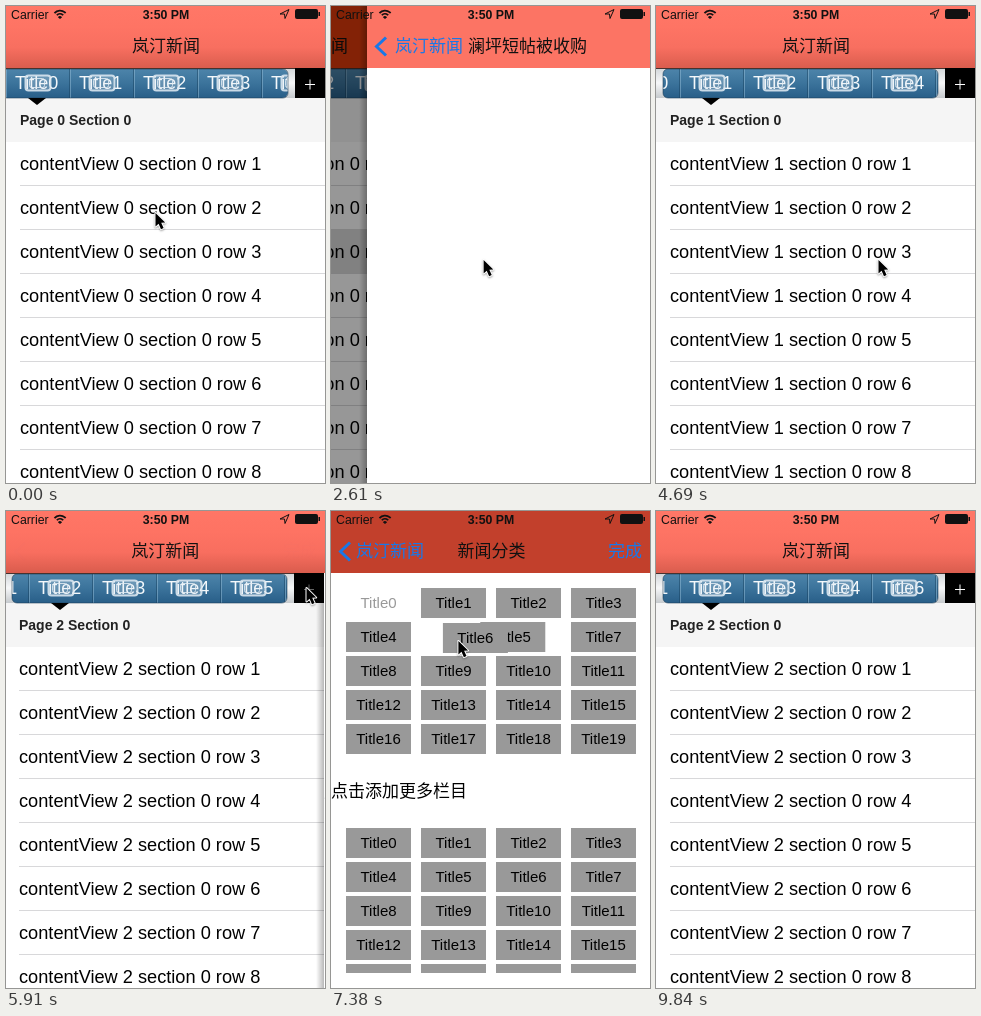
An HTML page with a canvas for the animation above (9.89 s loop, 319 by 477 pixels).

```html
<!DOCTYPE html>
<html lang="zh-CN">
<head>
<meta charset="utf-8">
<title>News tabs</title>
<style>
html, body { margin: 0; width: 100%; height: 100%; overflow: hidden; background: #fff; }
canvas { display: block; width: 319px; height: 477px; }
</style>
</head>
<body>
<canvas id="stage"></canvas>
<script>
const W = 319, H = 477, LOOP = 9890, NAV = 62;
const SANS = '"Liberation Sans", Arial, sans-serif';
const CJK = '"Noto Sans CJK SC", "Noto Sans CJK", sans-serif';
const BLUE = '#1878e8', RED = '#fc7464';
const APP = '岚汀新闻', STORY = '澜坪短帖被收购', CATEGORY = '新闻分类';

const canvas = document.getElementById('stage');
const c = canvas.getContext('2d');
const dpr = window.devicePixelRatio || 1;
canvas.width = Math.round(W * dpr);
canvas.height = Math.round(H * dpr);

const lerp = (a, b, k) => a + (b - a) * k;
const ramp = (t, a, b) => Math.min(1, Math.max(0, (t - a) / (b - a)));
const smooth = (t, a, b) => { const k = ramp(t, a, b); return k * k * (3 - 2 * k); };
const easeOut = (t, a, b) => 1 - (1 - ramp(t, a, b)) ** 3;

const PATH = [
  [60, 149, 207], [500, 162, 232], [1040, 152, 254], [2240, 152, 254],
  [2400, 116, 254], [2610, 152, 254], [3220, 232, 254], [3950, 232, 254],
  [4250, 110, 254], [4420, 110, 254], [4690, 222, 254], [4860, 222, 254],
  [5130, 105, 254], [5200, 105, 254], [5670, 300, 77], [6350, 300, 77],
  [6890, 180, 129], [7010, 180, 129], [7380, 127, 130], [7500, 115, 130],
  [7650, 115, 130], [8030, 262, 52], [8120, 279, 38], [8600, 279, 38],
  [9060, 219, 409], [9170, 219, 409], [9470, 306, 478]
];

function cursorAt(t) {
  const i = PATH.findIndex(k => k[0] > t);
  if (i === 0) return PATH[0].slice(1);
  if (i < 0) return PATH[PATH.length - 1].slice(1);
  const a = PATH[i - 1], b = PATH[i], k = ramp(t, a[0], b[0]);
  return [lerp(a[1], b[1], k), lerp(a[2], b[2], k)];
}

function rect(x, y, w, h, fill) {
  c.fillStyle = fill;
  c.fillRect(x, y, w, h);
}

function text(str, x, y, size, fill, opt = {}) {
  c.font = `${opt.weight || 400} ${size}px ${opt.cjk ? CJK : SANS}`;
  c.textAlign = opt.align || 'left';
  c.fillStyle = fill;
  c.fillText(str, x, y);
}

function round(x, y, w, h, r) {
  c.beginPath();
  c.roundRect(x, y, w, h, r);
}

function poly(points) {
  c.beginPath();
  points.forEach(p => c.lineTo(p[0], p[1]));
  c.closePath();
}

function fade(x0, y0, x1, y1, ...stops) {
  const g = c.createLinearGradient(x0, y0, x1, y1);
  stops.forEach((s, i) => g.addColorStop(i / (stops.length - 1), s));
  return g;
}

function layer(draw, dx = 0, alpha = 1) {
  c.save();
  c.globalAlpha = alpha;
  c.translate(Math.round(dx), 0);
  draw();
  c.restore();
}

function statusBar() {
  text('Carrier', 5, 13, 12.3, '#111');
  text('3:50 PM', 160, 13, 12.3, '#111', { weight: 700, align: 'center' });
  c.strokeStyle = c.fillStyle = '#111';
  c.lineWidth = 1.8;
  for (const r of [4.2, 7.4]) {
    c.beginPath();
    c.arc(54, 12, r, -Math.PI * 0.77, -Math.PI * 0.23);
    c.stroke();
  }
  c.beginPath();
  c.moveTo(54, 13);
  c.arc(54, 13, 2.8, -Math.PI * 0.77, -Math.PI * 0.23);
  c.fill();
  c.lineWidth = 1;
  poly([[274, 8], [283, 3.5], [279, 12.5], [278.5, 8]]);
  c.stroke();
  round(289, 3, 23, 10, 2);
  c.fill();
  rect(312.5, 6, 1.5, 4, '#111');
}

function listPage(page, selected) {
  rect(0, 92, W + 1, H - 92, '#fff');
  rect(0, 92, W + 1, 44, '#f5f5f5');
  text(`Page ${page} Section 0`, 14, 119, 14, '#222', { weight: 700 });
  for (let i = 0; i < 8; i++) {
    const y = 136 + 44 * i;
    if (selected === i + 1) rect(0, y - 1, W + 1, 45, '#d9d9d9');
    text(`contentView ${page} section 0 row ${i + 1}`, 14, y + 28, 18.2, '#000');
    rect(14, y + 43, W - 13, 1, '#d8d8da');
  }
}

function tab(label, x) {
  rect(x - 1, 63, 1, 29, 'rgba(20,60,90,.45)');
  rect(x, 63, 1, 29, 'rgba(150,190,215,.5)');
  text(label, x + 9, 83, 18, '#f4f8fb');
  c.strokeStyle = 'rgba(225,236,244,.85)';
  c.fillStyle = 'rgba(225,236,244,.25)';
  c.lineWidth = 2;
  round(x + 19.5, 69.5, 25, 15, 3);
  c.fill();
  c.stroke();
  c.lineWidth = 1;
  round(x + 23.5, 72.5, 15, 9, 2);
  c.stroke();
}

function tabStrip(s) {
  const scroll = Math.max(0, 64 * s.tab - 24);
  const left = 7 * ramp(scroll, 0, 12);
  rect(0, NAV, 290, 30, fade(0, NAV, 0, 92, '#d2d6d9', '#f6f7f8', '#c6cacd'));
  c.save();
  round(left, 63, 282 - left, 29, [left ? 5 : 0, 6, 6, left ? 5 : 0]);
  c.fillStyle = fade(0, 63, 0, 92, '#4d84aa', '#3b739b', '#285e88');
  c.fill();
  c.clip();
  s.tabs.forEach((n, i) => tab('Title' + n, i * 64 - scroll));
  c.restore();
  c.strokeStyle = 'rgba(25,55,80,.55)';
  c.lineWidth = 1;
  round(left - (left ? 0 : 4), 63, 282 - left + (left ? 0 : 4), 29, 5);
  c.stroke();
  rect(0, NAV, W, 1, '#46322f');
  const tip = 31 + 64 * s.tab - scroll;
  poly([[tip - 9, 92], [tip + 9, 92], [tip, 99]]);
  c.fillStyle = '#000';
  c.fill();
  rect(289, NAV, 31, 30, '#000');
  const ink = s.pressed ? '#666' : '#fff';
  rect(299, 78, 10, 1, ink);
  rect(303.5, 73.5, 1, 10, ink);
}

function mainBody(s) {
  rect(0, NAV, W + 1, H - NAV, '#fff');
  const base = Math.floor(s.page);
  for (const p of [base, base + 1]) {
    const x = 320 * (p - s.page);
    if (x < W) layer(() => listPage(p, s.selected), x);
  }
  tabStrip(s);
}

function detailBody() {
  rect(0, NAV, W + 1, H - NAV, '#fff');
}

function cell(label, x, y) {
  rect(x, y, 65, 30, '#999');
  text(label, x + 32.5, y + 20, 15, '#000', { align: 'center' });
}

const slot = i => [15 + 75 * (i % 4), 34 * Math.floor(i / 4)];

function categoryBody(t) {
  rect(0, NAV, W + 1, H - NAV, '#fff');
  text('Title0', 47.5, 97, 15, '#999', { align: 'center' });
  for (let i = 1; i < 20; i++) {
    if (i === 5 || i === 6) continue;
    const [x, y] = slot(i);
    cell('Title' + i, x, 77 + y);
  }
  cell('Title5', lerp(90, 165, smooth(t, 7180, 7465)), 111);
  // The held cell follows the pointer, then settles in its new slot.
  const [px, py] = cursorAt(Math.min(t, 7500));
  const held = t > 7010, drop = smooth(t, 7520, 7680);
  cell('Title6', held ? lerp(px - 15, 90, drop) : 165, held ? lerp(py - 18, 111, drop) : 111);

  text('点击添加更多栏目', 0, 286, 17, '#000', { cjk: true });
  c.save();
  c.beginPath();
  c.rect(0, 317, W + 1, 145);
  c.clip();
  for (let i = 0; i < 20; i++) {
    const [x, y] = slot(i);
    cell('Title' + i, x, 317 + y);
  }
  c.restore();
}

function chevron() {
  c.strokeStyle = BLUE;
  c.lineWidth = 3;
  c.beginPath();
  c.moveTo(19, 31.5);
  c.lineTo(9.5, 40.5);
  c.lineTo(19, 49.5);
  c.stroke();
}

// Soft dark patch left behind the pressed bar button.
function pressGlow() {
  c.beginPath();
  c.rect(0, 0, W + 1, NAV);
  c.clip();
  c.shadowColor = 'rgba(186,58,42,.9)';
  c.shadowBlur = 18 * dpr;
  c.shadowOffsetX = 600 * dpr;
  rect(242 - 600, -20, 110, 72, '#000');
}

// q runs from 0 (root title) to 1 (pushed title).
function navBar(q, o = {}) {
  rect(0, 0, W + 1, NAV, o.fill || fade(0, 0, 0, NAV, '#ff7767', '#fe7464', '#f86f60', '#d95d4e'));
  if (q > 0 && !o.fill) layer(() => rect(0, 0, W + 1, NAV, RED), 0, q);
  if (o.dark) layer(() => rect(0, 0, W + 1, NAV, '#c2402c'), 0, o.dark);
  if (o.glow) layer(pressGlow, 0, o.glow);
  const home = o.home || 25;
  const x = home + (126 - home) * (1 - q) ** 1.1;
  const title = { cjk: true, weight: 500 };
  if (q < 1) layer(() => text(APP, x, 46, 17, '#111', title), 0, 1 - q);
  if (q > 0) {
    layer(chevron, 0, q);
    layer(() => {
      text(APP, x, 46, 17, BLUE, { cjk: true });
      text(o.title, 160.5 + 136 * (1 - q), 46, 17, '#111', { ...title, align: 'center' });
    }, 0, q * q);
    if (o.done) layer(() => text('完成', 277, 46, 17, BLUE, { cjk: true }), 0, q * o.done);
  }
}

function edgeShadow(x) {
  rect(x - 8, 0, 8, H, fade(x - 8, 0, x, 0, 'rgba(0,0,0,0)', 'rgba(0,0,0,.28)'));
}

function stack(q, s, body, nav) {
  if (q < 1) layer(() => mainBody(s), -96 * q);
  if (q > 0) {
    const x = Math.round(320 * (1 - q));
    rect(0, NAV, x, H - NAV, `rgba(0,0,0,${0.1 * q})`);
    if (q < 1) edgeShadow(x);
    layer(body, x);
  }
  navBar(q, nav);
}

function dragBack(x, s) {
  const k = 1 - x / 320;
  layer(() => {
    mainBody(s);
    navBar(0, { fill: '#dd3a0a' });
  }, -200 * k);
  rect(0, 0, x, H, `rgba(0,0,0,${0.46 * k})`);
  edgeShadow(x);
  layer(() => {
    detailBody();
    navBar(1, { fill: RED, title: STORY, home: 28 });
  }, x);
}

function pageAt(t) {
  const first = lerp(0.38 * ramp(t, 3950, 4250), 1, easeOut(t, 4250, 4600));
  const second = lerp(0.366 * ramp(t, 4860, 5130), 1, easeOut(t, 5130, 5450));
  return first + second;
}

function pointer(t) {
  if (t >= 9470) return;
  const [x, y] = cursorAt(t);
  c.save();
  c.translate(x, y);
  poly([[0.5, 0], [0.5, 13.5], [3.6, 10.8], [6, 16.2], [8.6, 15], [6.2, 9.8], [10.2, 9.6]]);
  c.shadowColor = 'rgba(0,0,0,.35)';
  c.shadowBlur = 2 * dpr;
  c.shadowOffsetY = dpr;
  c.strokeStyle = '#fff';
  c.lineWidth = 2;
  c.lineJoin = 'round';
  c.stroke();
  c.shadowColor = 'transparent';
  c.fillStyle = '#000';
  c.fill();
  c.restore();
}

function draw(t) {
  c.setTransform(dpr, 0, 0, dpr, 0, 0);
  rect(0, 0, W, H, '#fff');
  const s = {
    page: pageAt(t),
    tab: smooth(t, 4300, 4650) + smooth(t, 5150, 5500),
    tabs: t < 8060 ? [0, 1, 2, 3, 4, 5, 6, 7] : [0, 1, 2, 3, 4, 6, 5, 7],
    selected: t >= 1180 && t < 3780 ? 3 : 0,
    pressed: t >= 5780 && t < 6350
  };
  if (t < 2400) {
    stack(smooth(t, 1280, 1800), s, detailBody, { title: STORY, home: 28 });
  } else if (t < 3780) {
    const drag = cursorAt(t)[0] - 116;
    dragBack(lerp(drag, 300, smooth(t, 3330, 3480)), s);
  } else {
    const q = smooth(t, 5890, 6340) - smooth(t, 8228, 8648);
    const leaving = t >= 8228;
    stack(q, s, () => categoryBody(t), {
      title: CATEGORY,
      dark: leaving ? 0 : q,
      glow: leaving ? q : 0,
      done: t >= 8180 ? 0.2 : 1
    });
  }
  statusBar();
  pointer(t);
}

const start = performance.now();
function tick() {
  draw((performance.now() - start) % LOOP);
  requestAnimationFrame(tick);
}
tick();
</script>
</body>
</html>
```
